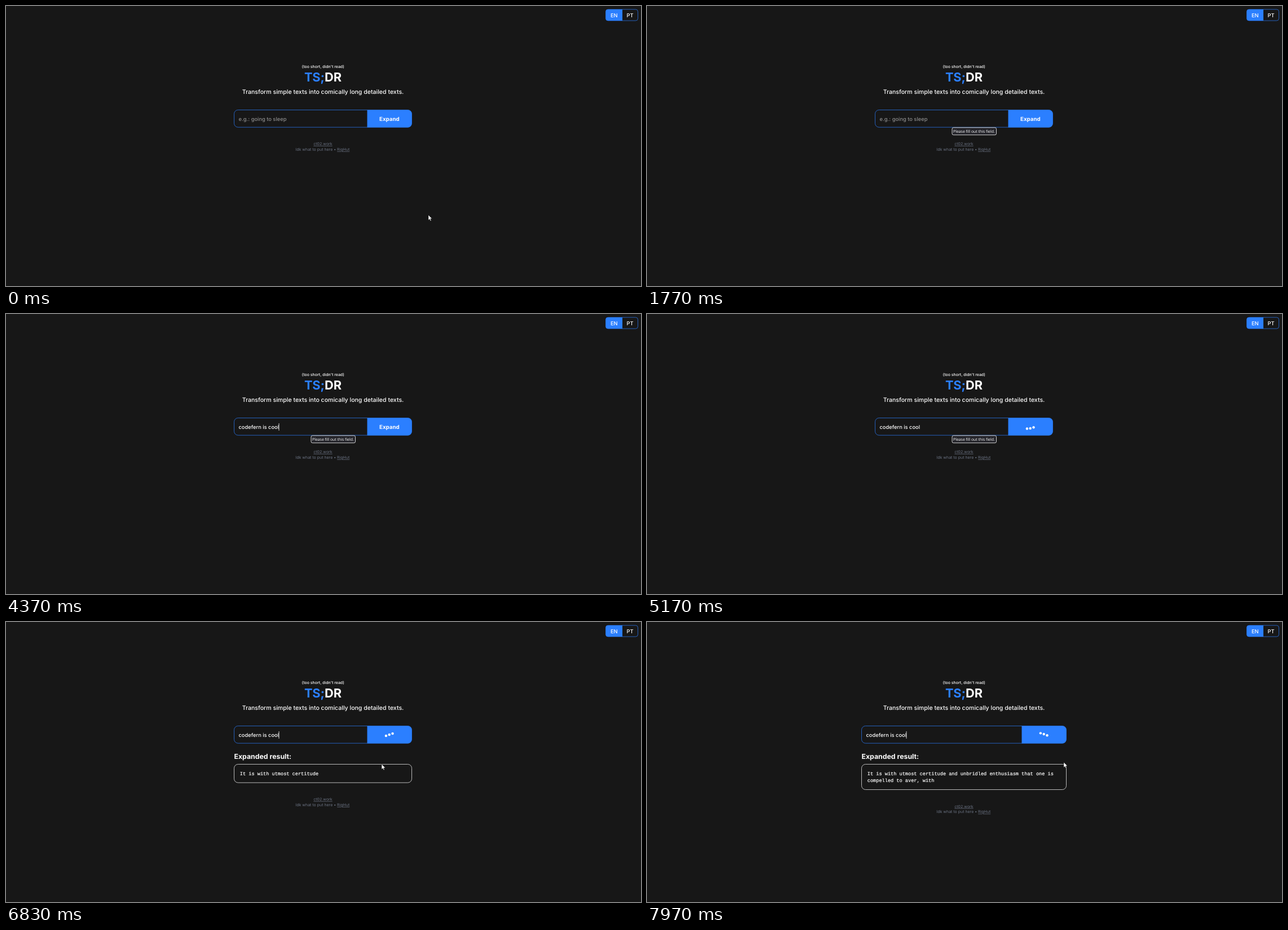
Write an HTML page that moves like this. It is 1126 px wide and 497 px high and loops after 8 s.

```html
<!DOCTYPE html>
<html lang="en">
<head>
<meta charset="utf-8">
<title>TS;DR</title>
<style>
html, body { margin: 0; width: 100%; height: 100%; overflow: hidden; background: #171717; }
svg { display: block; width: 1126px; height: 497px; }
text { font-family: Inter, sans-serif; font-weight: 500; fill: #fff; text-rendering: geometricPrecision; white-space: pre; }
.mid { text-anchor: middle; }
.bold { font-weight: 700; }
.field { font-size: 9.3px; }
.small { font-size: 7px; }
.gray { fill: #6a7282; font-weight: 400; }
.link { text-decoration: underline; text-decoration-thickness: .6px; }
.blue { fill: #2b7fff; }
.frame { fill: none; stroke: #2b7fff; stroke-width: .7; }
.mono { font: 8.6px "Liberation Mono", monospace; stroke: #fff; stroke-width: .2; }
.tip { font: 6.9px "Open Sans", sans-serif; }
</style>
</head>
<body>
<svg viewBox="0 0 1126 497">
  <path class="blue" d="M1093 6H1067.500a4 4 0 0 0-4 4V22a4 4 0 0 0 4 4H1093Z"/>
  <rect class="frame" x="1063.500" y="6" width="57" height="20" rx="4"/>
  <text class="field mid" x="1078.300" y="19.600">EN</text>
  <text class="field mid" x="1106.500" y="19.600">PT</text>

  <text class="small mid" x="562.200" y="109.700">(too short, didn't read)</text>
  <text class="bold mid" x="562" y="134" font-size="21.800"><tspan class="blue">TS;</tspan>DR</text>
  <text class="mid" x="562" y="156" font-size="10.550">Transform simple texts into comically long detailed texts.</text>

  <g id="footer">
    <text class="small gray mid link" x="562" y="247.400">ct02.work</text>
    <text class="small gray" x="513.300" y="257.200">Idk what to put here • <tspan class="link">RigHut</tspan></text>
  </g>

  <g id="form">
    <g id="button">
      <path class="blue" d="M-79 184.500H-7a7 7 0 0 1 7 7V208.500a7 7 0 0 1-7 7H-79Z"/>
      <text id="label" class="bold mid" x="-39.700" y="203.900" font-size="9.750">Expand</text>
      <g id="dots" fill="#fff">
        <circle cx="-45.600" r="2.200"/><circle cx="-39.800" r="2.200"/><circle cx="-34" r="2.200"/>
      </g>
    </g>
    <rect id="border" class="frame" x="0" y="184.500" height="30.700" rx="7"/>
    <text id="input" class="field" x="8" y="203.800"></text>
    <path id="caret" d="M0 194V207" stroke="#fff" stroke-width=".8"/>
    <g id="result">
      <text class="bold" y="243.200" font-size="12.300">Expanded result:</text>
      <rect id="box" class="frame" x="0" y="252.500" rx="7" style="stroke:#fff"/>
      <text id="line1" class="mono" x="10.300" y="271.800"></text>
      <text id="line2" class="mono" x="10.300" y="284.100"></text>
    </g>
  </g>

  <g id="tip">
    <rect x="541" y="215.800" width="78.500" height="13" rx="2.500" fill="#25252b" stroke="#fff" stroke-width=".8"/>
    <text class="tip" x="543" y="225.200">Please fill out this field.</text>
  </g>
  <path id="arrow" d="M0 0V9.200L2.100 7.200L3.600 10.400L5 9.800L3.600 6.600H6.500Z" fill="#fff" stroke="#000" stroke-width=".4"/>
  <path id="beam" d="M-2-6H2M0-6V6M-2 6H2" fill="none" stroke="#fff" stroke-width=".7"/>
</svg>
<script>
const $ = id => document.getElementById(id);
const show = (id, on) => $(id).setAttribute("opacity", +on);
const move = (id, x, y = 0) => $(id).setAttribute("transform", `translate(${x} ${y})`);
const set = (id, text) => { if ($(id).textContent !== text) $(id).textContent = text; };

const LOOP = 8000, BLINK = 530, FOCUS = 900, LOAD = 4570, STREAM = 6310, WORD = 115;
const PHRASE = "codefern is cool";
const KEYS = [1800, 1870, 2030, 2530, 2700, 2830, 3030, 3170, 3400, 3530, 3630, 3770, 3900, 4030, 4170, 4370];
const WORDS = "It is with utmost certitude and unbridled enthusiasm that one is compelled to aver, with".split(" ");
const MIN_W = 315, MAX_W = 363, CHAR = 5.16, PAD = 20.5, LINE = 64;
const PATH = [[270, 749, 371], [900, 541, 201], [5650, 541, 201], [6150, 651, 253],
              [6600, 655, 253], [7370, 692, 251], [7970, 739, 249]];

function mouse(t) {
  const i = PATH.findIndex(p => p[0] > t);
  if (i === 0) return PATH[0].slice(1);
  if (i < 0) return PATH.at(-1).slice(1);
  const [t0, x0, y0] = PATH[i - 1], [t1, x1, y1] = PATH[i];
  const k = (t - t0) / (t1 - t0);
  return [x0 + (x1 - x0) * k, y0 + (y1 - y0) * k];
}

function draw(t) {
  // streamed answer sets the width of the column
  const count = t < STREAM ? 0 : Math.floor((t - STREAM) / WORD) + 1;
  const text = WORDS.slice(0, count).join(" ");
  const wraps = text.length > LINE;
  const width = wraps ? MAX_W : Math.max(MIN_W, text.length * CHAR + PAD);
  const height = wraps ? 45 : 32.7;
  set("line1", text.slice(0, LINE));
  set("line2", text.slice(LINE + 1));
  show("result", count > 0);
  $("box").setAttribute("width", width);
  $("box").setAttribute("height", height);
  $("border").setAttribute("width", width);
  move("form", 562 - width / 2);
  move("button", width);
  move("footer", 0, count ? 37.3 + height : 0);

  // typing and caret
  const typed = KEYS.filter(k => k <= t);
  set("input", typed.length ? PHRASE.slice(0, typed.length) : "e.g.: going to sleep");
  $("input").style.fill = typed.length ? "#fff" : "#8b8b8b";
  const since = t - (typed.at(-1) ?? FOCUS);
  show("caret", since >= 0 && Math.floor(since / BLINK) % 2 === 0);
  move("caret", 8 + (typed.length ? $("input").getComputedTextLength() : 0));

  // waiting dots
  show("label", t < LOAD);
  show("dots", t >= LOAD);
  [...$("dots").children].forEach((dot, i) => {
    const angle = (t - 4640) / 2000 * 2 * Math.PI - i * 0.68;
    dot.setAttribute("cy", 200.2 + 3.3 * Math.sin(angle));
  });

  // pointer and tooltip
  const [x, y] = mouse(t);
  const hidden = t >= 1770 && t < 5650;
  const inField = y < 215.5 && x < 640;
  show("arrow", !hidden && !inField);
  show("beam", !hidden && inField);
  move("arrow", x, y);
  move("beam", x, y);
  show("tip", t < 1430 || t >= 5650 ? 0 : t < 1470 ? 0.6 : 1);
}

const start = performance.now();
function tick() {
  draw((performance.now() - start) % LOOP);
  requestAnimationFrame(tick);
}
tick();
</script>
</body>
</html>
```
